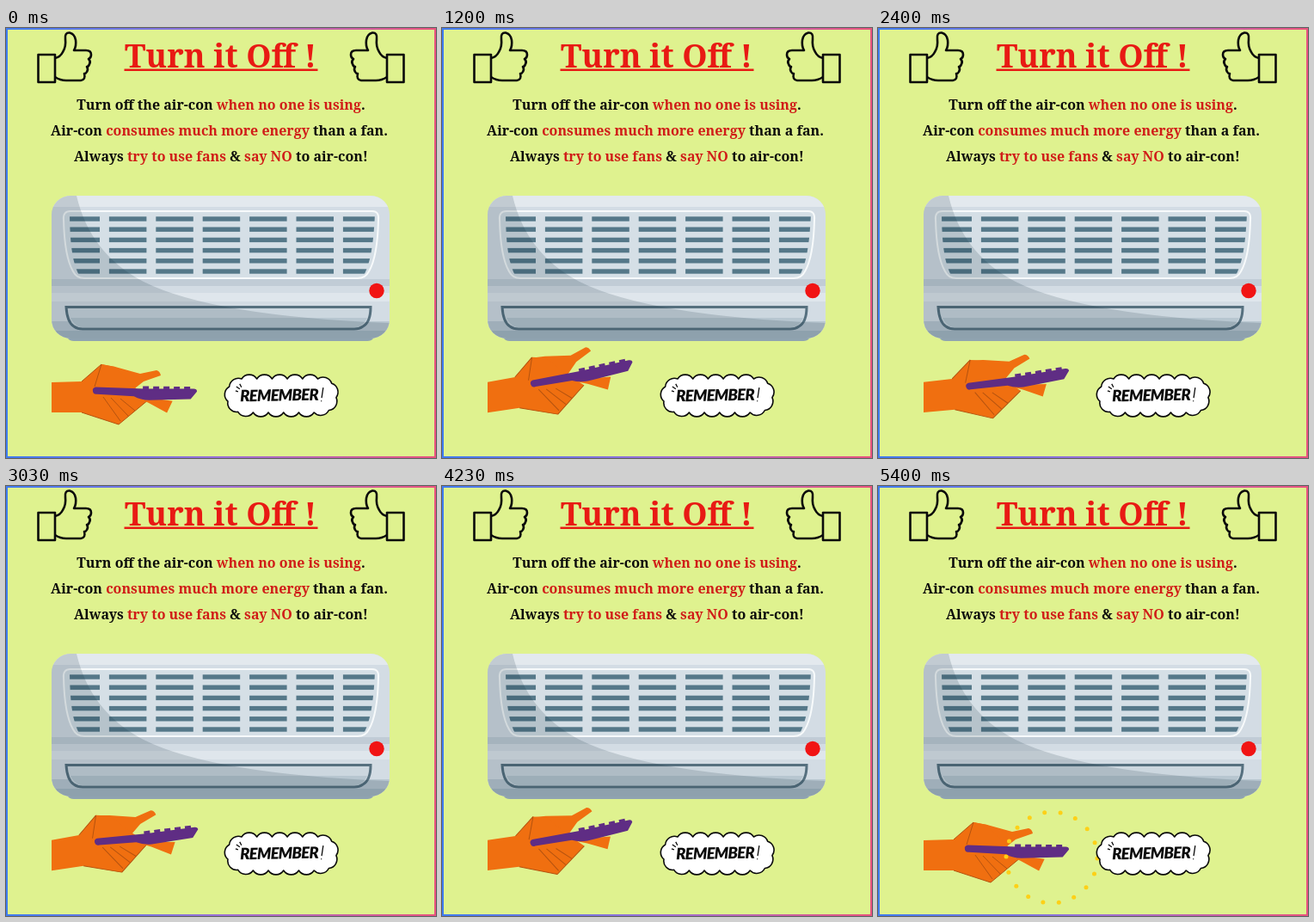
Animation of 500 by 500 pixels, one loop 5430 ms. Source, as an HTML page:

```html
<!DOCTYPE html>
<html lang="en">
<head>
<meta charset="utf-8">
<title>Turn it Off !</title>
<style>
  html, body { margin: 0; width: 100%; height: 100%; overflow: hidden; background: #dff28f; }
  svg { display: block; width: 100vw; height: 100vh; }
  .copy { font: 700 16px "Noto Serif", serif; text-anchor: middle; fill: #0b0b0b; }
  .copy tspan { fill: #d01d18; }
  .title { font: 700 37.3px "Noto Serif", serif; text-anchor: middle; fill: #e81a14; }
  .shout { font: italic 900 18.5px Lato, sans-serif; letter-spacing: -.8px; text-anchor: middle; fill: #0b0b0b; }
</style>
</head>
<body>
<svg viewBox="0 0 500 500">
  <defs>
    <linearGradient id="edge">
      <stop stop-color="#3f7bf0"/><stop offset=".5" stop-color="#9a70d8"/><stop offset="1" stop-color="#e8527f"/>
    </linearGradient>
    <clipPath id="body"><rect x="53" y="194" width="393" height="166" rx="22"/></clipPath>
    <clipPath id="panel"><path d="M74 214H429Q427 270 415 288H86Q74 270 74 214Z"/></clipPath>
    <clipPath id="sleeve"><path d="M53 340H300V500H53Z"/></clipPath>
    <g id="thumbsUp" fill="none" stroke="#0b0b0b" stroke-width="2.600" stroke-linejoin="round">
      <path d="M37.500 31H57V63H37.500Z"/>
      <path d="M57 35Q63 34 66 28Q70 22 69 13Q68 5 74 5.500Q80 7 81 14Q82 21 79 26H93Q99 26 99 31Q99 35 96 36Q99 39 97 42Q96 45 94 45Q96 48 94 51Q93 53 91 53Q93 60 87 61H70Q63 61 57 57"/>
    </g>
  </defs>

  <rect width="500" height="500" fill="#dff28f"/>
  <rect x="1" y="1" width="498" height="498" fill="none" stroke="url(#edge)" stroke-width="2"/>

  <use href="#thumbsUp"/>
  <use href="#thumbsUp" transform="matrix(-1 0 0 1 500 0)"/>

  <text class="title" x="249.500" y="45.700">Turn it Off !</text>
  <path d="M137.500 48.800H362.500" stroke="#e81a14" stroke-width="2.600"/>
  <text class="copy" x="250" y="94.500">Turn off the air-con <tspan>when no one is using</tspan>.</text>
  <text class="copy" x="248" y="124.500">Air-con <tspan>consumes much more energy</tspan> than a fan.</text>
  <text class="copy" x="250" y="154.500">Always <tspan>try to use fans</tspan> &amp; <tspan>say NO</tspan> to air-con!</text>

  <!-- air conditioner -->
  <g transform="translate(0 1)">
    <path d="M69 352H430L427 360Q425 363 420 363H79Q74 363 72 360Z" fill="#8fa3b0"/>
    <g clip-path="url(#body)">
      <rect x="53" y="194" width="393" height="166" fill="#d3dce4"/>
      <path d="M53 194H446V207H53Z" fill="#e3e9ee"/>
      <path d="M53 291H446V299H53Z" fill="#c1ccd6"/>
      <path d="M53 307H446V317H53Z" fill="#dfe6ec"/>
      <path d="M53 340H446V351H53Z" fill="#b9c7d1"/>
      <path d="M53 351H446V360H53Z" fill="#a6b7c3"/>
    </g>
    <path d="M75 212H426Q434 212 433 222Q432 265 422 282Q418 290 409 290H91Q82 290 78 282Q68 265 67 222Q66 212 75 212Z"
      fill="#d5dfe6" stroke="#f7fafb" stroke-width="2"/>
    <g id="slats" clip-path="url(#panel)" fill="#557889"/>
    <path d="M70 323.500H424Q424 341 415 346Q411 349 405 349H89Q83 349 79 346Q71 341 70 323.500Z"
      fill="#ccd7df" stroke="#56707f" stroke-width="3"/>
    <path d="M75 336H420Q416 345 408 347H87Q79 345 75 336Z" fill="#b7c6d0"/>
    <path clip-path="url(#body)" d="M53 194H82Q98 262 160 294Q240 334 446 342V360H53Z" fill="#0c2430" opacity=".15"/>
    <circle cx="431" cy="304.500" r="8.700" fill="#f11414"/>
  </g>

  <!-- hand holding the remote -->
  <g clip-path="url(#sleeve)">
    <g id="hand" fill="#f06f10">
      <path id="thumb" d="M111 391L127 394L156 402L175 398Q179 399 180 404L160 411L146 422L115 422Z"/>
      <path d="M30 412.500L88 411L111 391L127 394L150 418L166 432L131 461L88 447H30Z"/>
      <path d="M111 391L103 417M113 429L133 457M122 430L142 451M133 431L150 445M131 461L166 432M88 447L131 461M88 411L111 391"
        fill="none" stroke="#b5530f"/>
      <g id="grip">
        <path d="M45 4L93 9L87 23L65 12Z"/>
        <path fill="#5f2d84" d="M3-4Q-1-3 0 1Q1 5 5 4L48 5Q56 9 66 9L114 6L121-3Q121-6 117-6L60-4Z"/>
        <path stroke="#5f2d84" stroke-width="5" stroke-dasharray="7 5" d="M58-4.500L118-6"/>
      </g>
    </g>
  </g>
  <g id="burst" fill="#fdd017"/>

  <path id="cloud" fill="#fff" stroke="#0b0b0b" stroke-width="1.600" stroke-linejoin="round"
    d="M274 408H367A17 19.500 0 0 1 367 447H274A17 19.500 0 0 1 274 408Z"/>
  <g transform="rotate(-1 320 427)">
    <text class="shout" x="317.500" y="433.500">REMEMBER</text>
    <path d="M369 419L367 431M366.500 434v1M268 416l4 3M272 413l2 4M267 421l3 1" stroke="#0b0b0b" stroke-width="1.300"/>
  </g>
</svg>
<script>
const $ = id => document.getElementById(id);
const LOOP = 5430, STEP = 40;
const swings = [30, 1000, 1970, 2930, 3870, 4830];

let slats = "";
for (let row = 0; row < 6; row++)
  for (let col = 0; col < 7; col++)
    slats += `<rect x="${65.5 + col * 54.4}" y="${218.3 + row * 12.2}" width="43.5" height="5.4"/>`;
$("slats").innerHTML = slats;

// Turn the plain rounded outline into a ring of puffs.
function puff(path, count) {
  const length = path.getTotalLength();
  const at = i => { const p = path.getPointAtLength(i % count / count * length); return `${p.x} ${p.y}`; };
  let d = "M" + at(0);
  for (let i = 1; i <= count; i++) d += `A10.5 10.5 0 0 1 ${at(i)}`;
  path.setAttribute("d", d + "Z");
}
puff($("cloud"), 17);

function ease(x, from, to) {
  const u = Math.min(1, Math.max(0, (x - from) / (to - from)));
  return u * u * (3 - 2 * u);
}

function drawHand(step) {
  const fall = 1 - ease(step, 7, 14);
  const raise = ease(step, -0.3, 2) * fall;
  const press = ease(step, 2, 7) * fall;
  const set = (id, transform) => $(id).setAttribute("transform", transform);
  set("hand", `rotate(${-8.5 * raise} 53 430)`);
  set("thumb", `rotate(${-3 * raise - 9 * press} 115 400)`);
  set("grip", `translate(${101 + 4 * raise} 421.5) rotate(${2 + raise - 8 * press})`);
}

function drawBurst(step) {
  let dots = "";
  if (step >= 11 && step <= 14) {
    const left = 14 - step, radius = 53 - 3.5 * left - 1.5 * left * left;
    for (let i = 0; i < 18; i++) {
      const a = (i * 20 + 1) * Math.PI / 180;
      dots += `<circle cx="${202 + radius * Math.cos(a)}" cy="${432 + radius * Math.sin(a)}" r="2.5"/>`;
    }
  }
  $("burst").innerHTML = dots;
}

function frame() {
  const t = performance.now() % LOOP;
  const start = swings.filter(s => s <= t).pop();
  const step = start === undefined ? 15 : Math.floor((t - start) / STEP);
  drawHand(step);
  drawBurst(step);
  requestAnimationFrame(frame);
}
frame();
</script>
</body>
</html>
```
